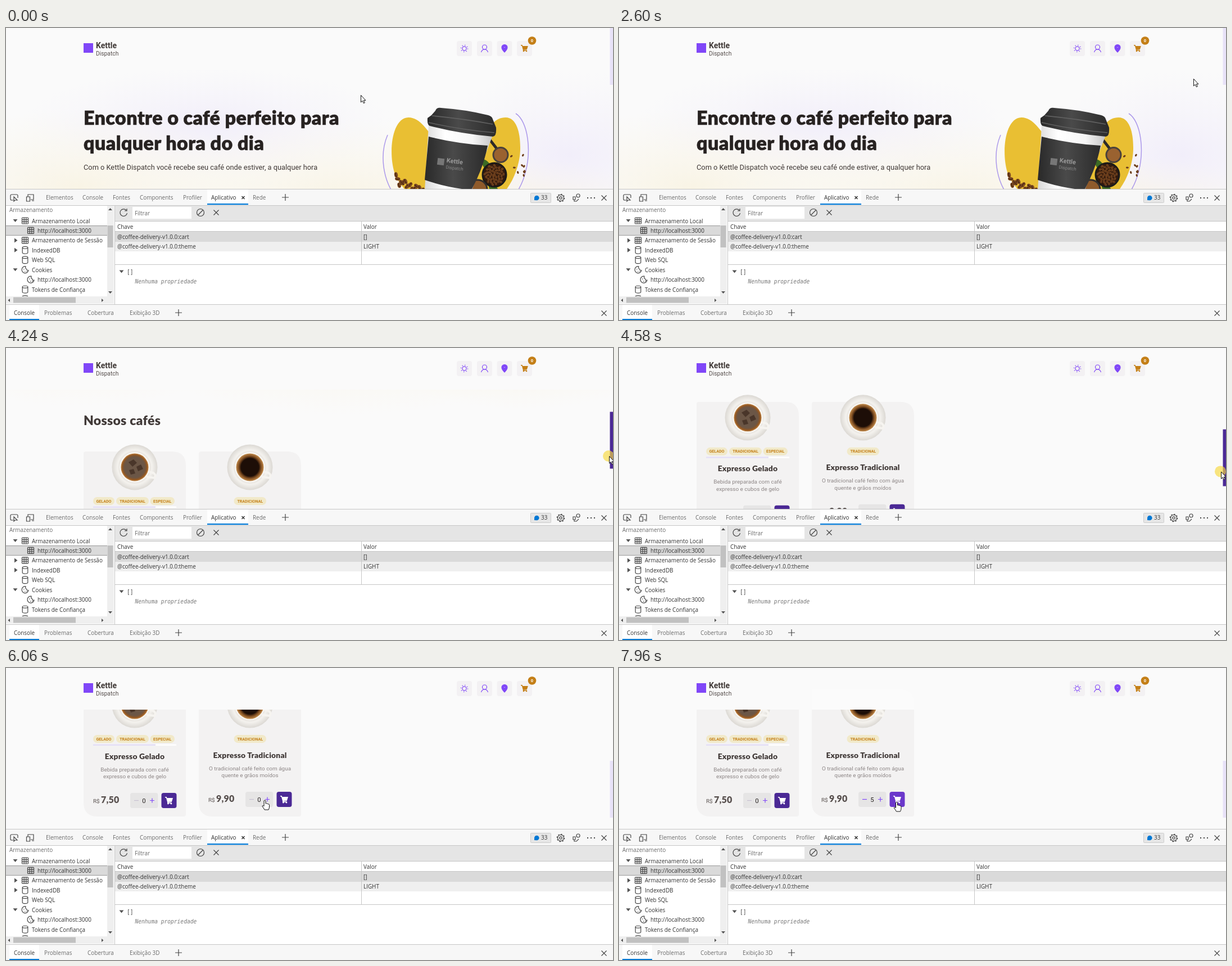
An HTML page that plays this animation: 1080x519 px, repeating every 8000 ms.

```html
<!DOCTYPE html>
<html lang="pt-BR">
<head>
<meta charset="utf-8">
<title>Loja de cafés</title>
<style>
html, body { margin: 0; width: 100%; height: 100%; overflow: hidden; background: #fafafa; }
svg { display: block; width: 1080px; height: 519px; }
text { white-space: pre; }
.h { font-family: Lato, sans-serif; font-weight: 900; fill: #272221; letter-spacing: .0115em; }
.hero { font-size: 34px; stroke: #272221; stroke-width: .6; }
.r { font-family: Roboto, sans-serif; font-size: 11.4px; fill: #574f4d; }
.d { font-family: "Open Sans", sans-serif; font-size: 9.92px; fill: #333; }
.tab { fill: #6b6b6b; }
.m { font-family: "DejaVu Sans Mono", monospace; font-size: 9.6px; fill: #444; }
.mid { text-anchor: middle; }
.line { fill: none; stroke: #444; stroke-width: 1.2; }
.brand { fill: none; stroke: #8047f8; stroke-width: 1.2; }
</style>
</head>
<body>
<svg viewBox="0 0 1080 519">
<defs>
  <radialGradient id="lilac"><stop stop-color="#e9e2fa" stop-opacity=".5"/><stop offset="1" stop-color="#efeafc" stop-opacity="0"/></radialGradient>
  <radialGradient id="cream"><stop stop-color="#f8eed0" stop-opacity=".5"/><stop offset="1" stop-color="#fbf4e0" stop-opacity="0"/></radialGradient>
  <linearGradient id="paper"><stop stop-color="#d8d8d8"/><stop offset=".3" stop-color="#fff"/><stop offset=".7" stop-color="#f6f6f6"/><stop offset="1" stop-color="#c4c4c4"/></linearGradient>
  <linearGradient id="dark"><stop stop-color="#292929"/><stop offset=".45" stop-color="#4a4a4a"/><stop offset="1" stop-color="#2b2b2b"/></linearGradient>
  <radialGradient id="plate"><stop offset=".6" stop-color="#dedad5"/><stop offset=".75" stop-color="#f4f2ee"/><stop offset="1" stop-color="#dcd9d4"/></radialGradient>
  <radialGradient id="crema"><stop offset=".65" stop-color="#1d0e07"/><stop offset=".8" stop-color="#7a4a20"/><stop offset="1" stop-color="#c28a4a"/></radialGradient>
  <radialGradient id="iced"><stop offset=".75" stop-color="#6b5646"/><stop offset=".88" stop-color="#8a5527"/><stop offset="1" stop-color="#bd7a35"/></radialGradient>
  <clipPath id="view"><path d="M0 0H1080V286H0Z"/></clipPath>
  <clipPath id="tree"><path d="M0 316H180V477H0Z"/></clipPath>
  <g id="cart"><path d="M-6-5.3h2.2l2 7.3h6.1l1.7-5.4H-3.3M-1.8 2l.3 2h6" fill="currentColor" stroke="currentColor" stroke-width="1.2"/><circle cx="-1" cy="5" r="1.3" fill="currentColor"/><circle cx="4" cy="5" r="1.3" fill="currentColor"/></g>
  <g id="grid" class="line"><rect x="-5.5" y="-5.5" width="11" height="11" rx="1"/><path d="M-5.5-1.8h11M-5.5 1.8h11M-1.8-5.5v11M1.8-5.5v11"/></g>
  <g id="db" class="line"><ellipse cy="-4.5" rx="4.8" ry="1.9"/><path d="M-4.8-4.5v9c0 2.5 9.6 2.5 9.6 0v-9"/></g>
  <g id="cookie" class="line"><path d="M1-6A6 6 0 1 0 6 1Q3 2 3-1Q0-2 1-6Z"/><path d="M-3-1h1.5M-1 3h1.5M2.5 3H4"/></g>
  <path id="x" class="line" d="M-4.5-4.5l9 9m0-9l-9 9"/>
  <path id="plus" class="line" d="M-6 0H6M0-6V6"/>
  <g id="bean"><ellipse rx="5" ry="3.3" fill="#7d4a22"/><path d="M-4 0Q0 2 4-.5" fill="none" stroke="#2c1509"/></g>
</defs>

<g clip-path="url(#view)">
  <rect width="1080" height="286" fill="#fafafa"/>
  <g id="page">
    <ellipse cx="360" cy="170" rx="330" ry="100" fill="url(#lilac)"/>
    <ellipse cx="1000" cy="225" rx="260" ry="150" fill="url(#lilac)"/>
    <ellipse cx="130" cy="285" rx="330" ry="140" fill="url(#cream)"/>
    <ellipse cx="600" cy="300" rx="400" ry="140" fill="url(#cream)"/>
    <ellipse cx="920" cy="330" rx="260" ry="100" fill="url(#cream)"/>
    <text class="h hero" x="138" y="171.500">Encontre o café perfeito para</text>
    <text class="h hero" x="138" y="216.500">qualquer hora do dia</text>
    <text class="r" x="138" y="252" style="font-size:12.8px;fill:#403937">Com o Kettle Dispatch você recebe seu café onde estiver, a qualquer hora</text>
    <g id="perks"></g>

    <path fill="#e9bf33" d="M716 159C738 159 750 185 762 195H850C860 175 870 159 889 159C908 159 915 185 915 212C916 255 885 326 815 327C770 327 715 310 693 262C680 230 684 160 716 159Z"/>
    <path fill="none" stroke="#ab98ea" stroke-width="1.500" d="M679 190C664 225 671 270 692 298C722 336 770 340 805 339C870 337 905 310 920 270C938 220 928 165 907 152"/>
    <g id="beans"></g>
    <path fill="#3c6a24" d="M846 232q18 4 18 24q-18-4-18-24M858 275q20 2 21 28q-20-6-21-28M850 288q20 8 24 17q-16 4-24-17"/>
    <path stroke="#2d2a28" stroke-width="5" stroke-linecap="round" d="M862 200L872 213"/>
    <circle cx="880" cy="225.500" r="13" fill="#9a6230" stroke="#4a413b" stroke-width="3"/>
    <circle cx="869" cy="261" r="21" fill="#321a0d" stroke="#1c1a19" stroke-width="3"/>
    <g id="bowl"></g>
    <circle cx="839" cy="287" r="17" fill="#8f5a2b" stroke="#332f2c" stroke-width="3"/>
    <path fill="url(#paper)" d="M752 172L867 188L817 319Q814 324 804 322L750 312Q744 311 744 305Z"/>
    <path fill="url(#dark)" d="M752 193Q804 206 857 209Q849 250 828 288Q785 284 745 270Z"/>
    <path fill="url(#dark)" d="M764 147Q766 141 774 142Q818 145 858 155Q865 157 866 162L872 177Q873 193 866 193Q808 188 754 174Q749 172 750 160L757 155Z"/>
    <path fill="none" stroke="#606060" stroke-width="1.500" d="M758 156Q812 161 866 171M752 168Q810 181 869 186"/>
    <g transform="translate(769 226) rotate(7)">
      <rect width="12" height="12" y="5" fill="#777"/>
      <text class="r" x="16" y="11" style="font-size:11px;font-weight:700;fill:#999">Kettle</text>
      <text class="r" x="16" y="22" style="font-size:8px;fill:#888">Dispatch</text>
    </g>

    <text class="h" x="138" y="458" font-size="23" style="fill:#403937">Nossos cafés</text>
    <g id="cards"></g>
  </g>

  <rect width="1080" height="74" fill="#fafafa"/>
  <path id="glow" d="M343 38H500Q525 38 525 63V74H343Z" fill="#fff" opacity=".15"/>
  <rect x="138" y="27" width="17" height="17" fill="#8047f8"/>
  <text class="r" x="160" y="36" style="font-size:14px;font-weight:700;fill:#403937">Kettle</text>
  <text class="r" x="160" y="49" style="font-size:10.3px">Dispatch</text>
  <g fill="#f3f1f3"><rect x="802" y="23" width="27" height="27" rx="4"/><rect x="838" y="23" width="27" height="27" rx="4"/><rect x="873.500" y="23" width="27" height="27" rx="4"/><rect x="909" y="23" width="27" height="27" rx="4"/></g>
  <g class="brand">
    <circle cx="815.500" cy="36.500" r="3.600"/><circle cx="815.500" cy="36.500" r="6" stroke-dasharray="1.2 3.512" stroke-width="1.500"/>
    <circle cx="851.500" cy="34" r="4"/><path d="M845.500 43Q847 38 851.500 38T857.500 43"/>
    <path fill="#8047f8" d="M887 43Q882 38 882 34.500a5 5 0 0 1 10 0Q892 38 887 43Z"/><circle cx="887" cy="34.500" r="1.200" fill="#fff"/>
  </g>
  <use href="#cart" x="922" y="36" color="#c47f17"/>
  <circle cx="936" cy="22.500" r="7.300" fill="#c47f17"/>
  <text class="r mid" x="936" y="25.200" style="font-size:7.500px;font-weight:700;fill:#fff">0</text>
  <rect id="thumb" x="1074.500" width="5.500" height="101"/>
</g>

<rect y="286" width="1080" height="233" fill="#fff"/>
<path fill="#f7f7f7" d="M0 287H1080V315H0ZM0 491H1080V519H0Z"/>
<path fill="#e5e5e5" d="M194 316H1080V343H194Z"/>
<path fill="#fff" d="M358 287h73v28h-73zM225 318h105v21H225zM6 492h53v25H6z"/>
<path fill="#0078d4" d="M358 312h73v2.200h-73zM6 517h53v2H6z"/>
<path fill="#dadada" d="M0 352H180V368H0ZM194 362H1080V380H194Z"/>
<path fill="#efefef" d="M194 380H1080V397H194ZM180 316h12v174H0V477H180Z"/>
<path fill="#c1c1c1" d="M180.500 351h10v39h-10zM13 478.500h111v10H13z"/>
<path fill="none" stroke="#c6c6c6" d="M0 286.500H1080M0 315.500H1080M193.500 316V491M194 343.500H1080M194 361.500H1080M632.500 344V420M194 420.500H1080M0 491.500H1080"/>
<path fill="none" stroke="#999" d="M0 351.500H180M0 368.500H180"/>
<path fill="#555" d="M182 324h7l-3.500-4zM182 468h7l-3.500 4zM7 481v6l-3.500-3zM170 481v6l3.500-3zM201.500 430.500h8l-4 5z"/>
<g class="line">
  <path d="M13 306H10q-2 0-2-2v-6q0-2 2-2h9q2 0 2 2v4M14 300v8l2-2h4z"/>
  <path d="M39 300v-4h10v9h-5M36.500 300h6v8h-6zM46 307h4"/>
  <path d="M214 324a6.300 6.300 0 1 0 1.500 5M215 321v4h-4"/>
  <circle cx="346" cy="328" r="6.500"/><path d="M341.500 332.500l9-9"/>
  <circle cx="987" cy="302" r="2.200"/><circle cx="987" cy="302" r="5.400"/><circle cx="987" cy="302" r="6.700" stroke-dasharray="2.600 2.660"/>
  <circle cx="1018" cy="298" r="3"/><path d="M1009 300h4v5h-4zM1011 305v3h4l4-4"/>
  <path stroke-width="2" stroke-dasharray="2 4" d="M1034 302h14"/>
</g>
<rect x="933.500" y="293.500" width="36" height="17" rx="1" fill="#e6e6e6" stroke="#ccc"/>
<path fill="#0078d4" d="M940 306v-4a4.300 4.300 0 1 1 4.300 4.300z"/>
<g id="tools"></g>
<use href="#x" x="1064" y="302"/><use href="#x" x="1064" y="507"/><use href="#x" x="374" y="328"/>
<use href="#plus" x="497" y="301"/><use href="#plus" x="307" y="506"/>
<path stroke="#333" stroke-width="1.500" d="M419.500 299l5 5m0-5l-5 5"/>
<g clip-path="url(#tree)" id="nodes"></g>
<text class="m" x="215" y="436.500">[]</text>
<text class="m" x="229.500" y="454" style="font-style:italic;fill:#777">Nenhuma propriedade</text>

<g id="pointer">
  <circle id="press" cx="-1" r="10" fill="#f7d83c" opacity=".65"/>
  <path id="arrow" d="M.5.5V13L3.300 10.400L5.300 14.800L7.300 13.900L5.300 9.700H9Z" fill="#fff" stroke="#111"/>
  <path id="hand" d="M-1.500 1Q0-1 1.500 1V6Q3 5 4 6.300Q5.500 5.800 6.300 7Q8 6.800 8 8.500V12Q8 14 6.500 17H-.5Q-2 14-4.500 11Q-5 8.500-1.500 10.500Z" fill="#fff" stroke="#111"/>
</g>
</svg>

<script>
const $ = id => document.getElementById(id);
const text = (cls, x, y, s, style = '') => `<text class="${cls}" x="${x}" y="${y}" style="${style}">${s}</text>`;

// Hero perks
const perks = [
  [149, 304.5, '#c47f17', 'Compra simples e segura', '<use href="#cart" transform="scale(.75)" color="#fff"/>'],
  [328, 304.5, '#574f4d', 'Embalagem mantém o café intacto', '<path d="M0-5L4.500-2.500V2.500L0 5L-4.500 2.500V-2.500Z" fill="#fff"/><path d="M-4.500-2.500L0 0L4.500-2.500M0 0V5" stroke="#574f4d" fill="none"/>'],
  [149, 341, '#dbac2c', 'Entrega rápida e rastreada', '<circle r="4.300" cy=".5" fill="#fff"/><path d="M-1.500-5H1.500" stroke="#fff"/><path d="M0 .5L2-1.500" stroke="#dbac2c"/>'],
  [328, 341, '#8047f8', 'O café chega fresquinho até você', '<path d="M-5-1.500H3.500V1Q3 4-1 4T-5 1ZM3-1H5.500V1.500H3M-3-5v2M0-5v2" fill="#fff" stroke="#fff" stroke-width=".8"/>'],
];
$('perks').innerHTML = perks.map(([x, y, color, label, icon]) =>
  `<g transform="translate(${x} ${y})"><circle r="11.500" fill="${color}"/>${icon}</g>` + text('r', x + 20, y + 4, label)).join('');

// Scattered beans
let seed = 11;
const rand = () => (seed = seed * 16807 % 2147483647) / 2147483647;
const bean = (x, y, size) => `<use href="#bean" transform="translate(${x} ${y}) rotate(${rand() * 180}) scale(${size})"/>`;
const many = (n, make) => Array.from({ length: n }, (_, i) => make(i)).join('');
$('beans').innerHTML =
  many(24, i => bean(694 + i * 2.8, 270 + i * 1.5 + (rand() - .5) * 18, .95)) +
  many(9, () => bean(898 + rand() * 25, 226 + rand() * 36, .5));
$('bowl').innerHTML = many(42, i => {
  const a = i * 2.4, r = Math.sqrt(i / 42) * 18;
  return bean(869 + r * Math.cos(a), 261 + r * Math.sin(a), .55);
});

// Product cards; the lower block of the single-tag card sits two pixels higher
const card = (x, lift, name, lines, price, tags, extra, coffee) => {
  const y = v => v - lift, mid = x + 91;
  return `<path d="M${x + 4} 505H${x + 157}Q${x + 182} 505 ${x + 182} 530V727Q${x + 182} 731 ${x + 178} 731H${x + 25}Q${x} 731 ${x} 706V509Q${x} 505 ${x + 4} 505Z" fill="#f3f2f2"/>
  <circle cx="${mid}" cy="533" r="40.500" fill="url(#plate)"/>
  <path d="M${mid + 20} 540l13 3q6 4 2 9l-14-2" fill="none" stroke="#f6f4f0" stroke-width="4"/>
  <circle cx="${mid}" cy="533" r="27" fill="#f8f6f2"/><circle cx="${mid}" cy="533" r="24.500" fill="url(#${coffee})"/>${extra}` +
  tags.map(([tx, w, s]) => `<rect x="${tx}" y="586" width="${w}" height="14" rx="7" fill="#f1e9c9"/>` +
    text('r mid', tx + w / 2, 595.6, s, 'font-size:7.1px;font-weight:700;fill:#c47f17')).join('') +
  text('h mid', mid, y(628.5), name, 'font-size:13.9px;fill:#403937') +
  lines.map((s, i) => text('r mid', mid, y(650.5 + i * 12.7), s, 'font-size:9.95px;fill:#8d8686')).join('') +
  text('r', x + 17, y(707), 'R$', 'font-size:9.95px') + text('h', x + 31, y(707), price, 'font-size:16px;fill:#574f4d') +
  `<rect x="${x + 83}" y="${y(689)}" width="49.500" height="27" rx="4" fill="#e6e5e5"/>
  <path class="minus" d="M${x + 90} ${y(702.5)}h8" stroke="#c5bfd0" stroke-width="1.200"/>
  <path class="brand" d="M${x + 118} ${y(702.5)}h8m-4-4v8"/>` +
  text('r mid count', x + 107.5, y(706.5), '0', 'fill:#272221') +
  `<rect class="buy" x="${x + 138.500}" y="${y(689)}" width="27" height="27" rx="4" fill="#4b2995"/>
  <use href="#cart" transform="translate(${x + 151.5} ${y(702.5)}) scale(1.1)" color="#fff"/>`;
};
$('cards').innerHTML =
  card(138, 0, 'Expresso Gelado', ['Bebida preparada com café', 'expresso e cubos de gelo'], '7,50',
    [[155, 38, 'GELADO'], [196, 58, 'TRADICIONAL'], [256.5, 43.5, 'ESPECIAL']],
    '<path d="M218 524l9-5 6 6-8 7zM232 532l8-4 4 8-9 4zM219 538l8-2 3 8-8 2z" fill="#4a362a"/><path d="M155 602.500h148v2.500H155z" fill="#fff"/><path d="M155 602.500h111v2.500H155z" fill="#e3def6"/>', 'iced') +
  card(343, 2, 'Expresso Tradicional', ['O tradicional café feito com água', 'quente e grãos moídos'], '9,90',
    [[405.5, 57.5, 'TRADICIONAL']], '', 'crema');

// Developer tools labels
const labels = [
  [71, 305, 'Elementos'], [136, 305, 'Console'], [190, 305, 'Fontes'], [238, 305, 'Components'],
  [315, 305, 'Profiler'], [439, 305, 'Rede'], [68, 510, 'Problemas'], [145, 510, 'Cobertura'],
  [220, 510, 'Exibição 3D'], [229, 333, 'Filtrar'],
];
const strong = [
  [365, 305, 'Aplicativo'], [14, 510, 'Console'], [952, 305, '33'], [198, 356.5, 'Chave'], [636, 356.5, 'Valor'],
  [198, 375, '@coffee-delivery-v1.0.0:cart'], [636, 375, '[]'],
  [198, 392, '@coffee-delivery-v1.0.0:theme'], [636, 392, 'LIGHT'],
];
$('tools').innerHTML = labels.map(a => text('d tab', ...a)).join('') + strong.map(a => text('d', ...a)).join('');

const nodes = [
  ['grid', 34, 'Armazenamento Local', 'open'], ['grid', 44, 'http://localhost:3000'],
  ['grid', 34, 'Armazenamento de Sessão', 'closed'], ['db', 34, 'IndexedDB', 'closed'], ['db', 34, 'Web SQL'],
  ['cookie', 34, 'Cookies', 'open'], ['cookie', 44, 'http://localhost:3000'], ['db', 34, 'Tokens de Confiança'], ['db', 34, ''],
];
const marks = { open: 'M12.500-2.500h8l-4 5z', closed: 'M15-4v8l5.500-4z' };
$('nodes').innerHTML = text('d tab', 6, 326.5, 'Armazenamento') + nodes.map(([icon, x, label, mark], i) => {
  const y = 342.5 + i * 17.45;
  return `<use href="#${icon}" x="${x}" y="${y}"/>` + text('d', x + 12, y + 4, label) +
    (mark ? `<path d="${marks[mark]}" transform="translate(0 ${y})" fill="#555"/>` : '');
}).join('');

// Timeline: movement is sampled in bursts of [first, last, steps]
const bursts = [[640, 1390, 12], [2090, 2340, 5], [2600, 2950, 6], [3150, 3900, 12], [4160, 4910, 12],
  [5010, 5040, 2], [5510, 6270, 12], [7550, 7960, 7]];
const path = [[572, 631, 119], [760, 640, 160], [980, 660, 262], [1180, 656, 335], [1390, 641, 373],
  [2028, 641, 373], [2150, 745, 305], [2280, 960, 125], [2340, 1011, 93], [2530, 1011, 93], [2600, 1022, 90],
  [2750, 1056, 78], [2950, 1075, 71], [3150, 1075, 73], [3355, 1075, 86], [3560, 1075, 114], [3900, 1074, 181],
  [4092, 1074, 182], [4228, 1073, 192], [4560, 1071, 219], [4910, 1070, 236], [5040, 1069, 239],
  [5441, 1069, 239], [5640, 950, 222], [5790, 720, 210], [5920, 520, 224], [6060, 460.5, 235], [6270, 463, 234],
  [7687, 463, 234], [7823, 480, 237], [7960, 494, 238]];
const scroll = [[3218, 0], [3355, 15], [3560, 71], [3730, 180], [3900, 288], [4092, 290], [4228, 321],
  [4500, 395], [4700, 436], [4910, 458], [5040, 467]];
const presses = [[380, 440], [1610, 1750], [3150, 5180], [6470, 6540], [6740, 6810], [7080, 7180], [7280, 7550], [7618, 7687]];
const counts = [6540, 6810, 7180, 7550, 7687];

// The tolerance absorbs the 10 ms rounding of step times
const snap = t => {
  for (const [a, b, n] of bursts) {
    const step = (b - a) / (n - 1);
    if (t >= a - step && t < a) return a - step;
    if (t >= a && t <= b) return a + Math.floor((t - a) / step + .06) * step;
  }
  return t;
};
const at = (keys, t, k) => {
  const i = keys.findIndex(key => key[0] > t);
  if (i < 0) return keys.at(-1)[k];
  if (!i) return keys[0][k];
  const [p, q] = [keys[i - 1], keys[i]];
  return p[k] + (q[k] - p[k]) * (t - p[0]) / (q[0] - p[0]);
};
const show = (id, on) => $(id).style.display = on ? '' : 'none';
const [, count] = document.querySelectorAll('.count');
const [, buy] = document.querySelectorAll('.buy');
const [, minus] = document.querySelectorAll('.minus');

function draw() {
  const t = performance.now() % 8000, s = snap(t);
  const x = at(path, s, 1), y = at(path, s, 2), top = at(scroll, s, 1);
  const total = counts.filter(c => t >= c).length;
  const hand = t > 5500 && x < 470 || t >= 7550;
  $('page').setAttribute('transform', `translate(0 ${-top})`);
  $('thumb').setAttribute('y', top / 2.83);
  $('thumb').setAttribute('fill', t >= 3150 && t < 5180 ? '#4b2995' : '#e8e2f8');
  $('pointer').setAttribute('transform', `translate(${x} ${y})`);
  show('press', presses.some(([a, b]) => t >= a && t < b));
  show('arrow', !hand);
  show('hand', hand);
  show('glow', t >= 6470);
  count.textContent = total;
  minus.setAttribute('stroke', total ? '#8047f8' : '#c5bfd0');
  buy.setAttribute('fill', s >= 7955 ? '#6b38cb' : s >= 7890 ? '#5b30b0' : '#4b2995');
  requestAnimationFrame(draw);
}
draw();
</script>
</body>
</html>
```
